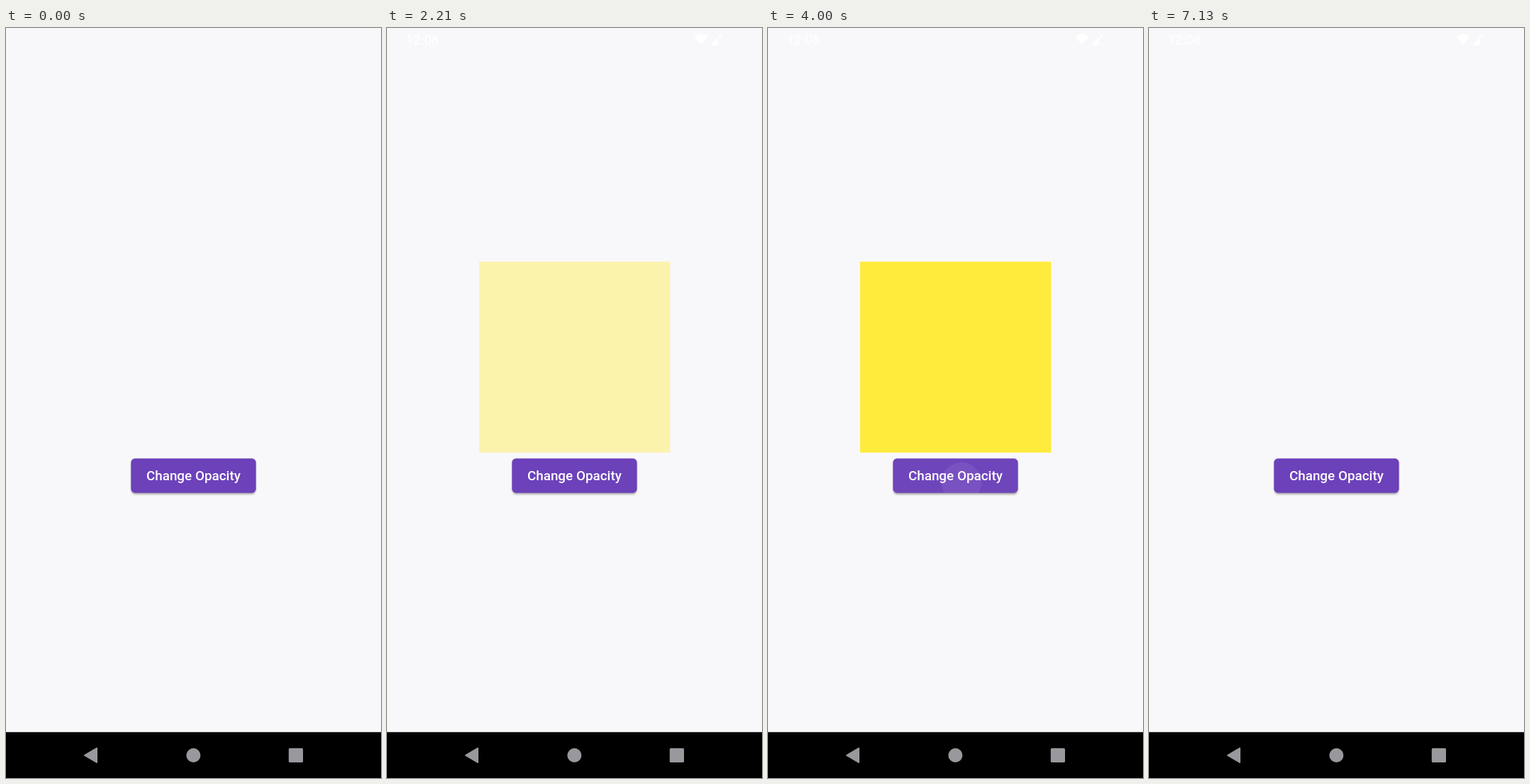
Recreate the animation shown at these times as an HTML page. Size 529 px wide and 1058 px high, loop 7180 ms.

```html
<!DOCTYPE html>
<html lang="en">
<head>
<meta charset="utf-8">
<title>Change Opacity</title>
<style>
  html, body { margin: 0; width: 100%; height: 100%; overflow: hidden; background: #f8f8fa; }
  svg { display: block; width: 100%; height: 100%; }
  text { font-family: Roboto, Arial, sans-serif; fill: #fff; }
</style>
</head>
<body>
<svg viewBox="0 0 529 1058">
  <defs>
    <clipPath id="buttonClip"><rect x="176.3" y="607.3" width="176.3" height="48.4" rx="5.4"/></clipPath>
    <filter id="blur" x="-20%" y="-50%" width="140%" height="200%"><feGaussianBlur id="shadowBlur" stdDeviation="1.6"/></filter>
  </defs>
  <rect width="529" height="1058" fill="#f8f8fa"/>

  <g id="status" fill="#fff">
    <text x="26.5" y="23" font-size="18.8">12:08</text>
    <path d="M433.5 12.2Q443 4.8 452.5 12.2L443 23.8Z"/>
    <path d="M456 24.2L472 8.2V13H467V24.2Z"/>
    <path d="M469 22.2h3v2h-3z"/>
  </g>

  <rect id="box" x="130" y="329.6" width="269.3" height="269.3" fill="#ffeb3b"/>

  <rect id="shadow" x="177" y="609.5" width="175" height="48" rx="5.4" opacity=".38" filter="url(#blur)"/>
  <g clip-path="url(#buttonClip)">
    <rect x="176" y="607" width="177" height="49" fill="#6c41ba"/>
    <rect id="highlight" x="176" y="607" width="177" height="49" fill="#fff"/>
    <circle id="ripple" fill="#fff"/>
  </g>
  <text x="264.4" y="638.3" font-size="18.86" font-weight="500" text-anchor="middle">Change Opacity</text>

  <rect y="993.3" width="529" height="65" fill="#000"/>
  <g fill="#99989d">
    <path d="M111 1026L128 1016V1036Z" stroke="#99989d" stroke-width="2" stroke-linejoin="round"/>
    <circle cx="264.4" cy="1026" r="10"/>
    <rect x="398.8" y="1016" width="20.2" height="20" rx="1.5"/>
  </g>
</svg>
<script>
const LOOP = 7180;
const FADE = 2000;
const INK = 0.24;
const TAP_POINT = { x: 273, y: 641 };
const CENTER = { x: 264.4, y: 631.5 };
const FULL_RADIUS = 92;
const taps = [{ down: 1265, up: 1400 }, { down: 3980, up: 4125 }];

const el = id => document.getElementById(id);
const [status, box, shadow, shadowBlur, highlight, ripple] =
  ['status', 'box', 'shadow', 'shadowBlur', 'highlight', 'ripple'].map(el);
const clamp = v => Math.min(1, Math.max(0, v));
const mix = (a, b, p) => a + (b - a) * p;
const set = (node, attrs) => {
  for (const name in attrs) node.setAttribute(name, attrs[name]);
};

// Cubic bezier (0.25, 0.1, 0.25, 1), solved by bisection.
function ease(x) {
  let lo = 0, hi = 1;
  for (let i = 0; i < 18; i++) {
    const s = (lo + hi) / 2;
    const bx = 0.75 * s * (1 - s) + s ** 3;
    if (bx < x) lo = s; else hi = s;
  }
  return 0.3 * lo * (1 - lo) ** 2 + 3 * lo * lo * (1 - lo) + lo ** 3;
}

function pressLevel(t, { down, up }) {
  const peak = clamp((Math.min(t, up) - down) / 200);
  return clamp(peak - Math.max(0, t - up) / 200);
}

// The ripple grows slowly while held, then quickly, and fades after release.
function rippleState(t, { down, up }) {
  const grown = (Math.min(t, up) - down) / 1000 + Math.max(0, t - up) / 225;
  const p = ease(clamp(grown));
  return {
    cx: mix(TAP_POINT.x, CENTER.x, p),
    cy: mix(TAP_POINT.y, CENTER.y, p),
    r: FULL_RADIUS * mix(0.3, 1, p),
    opacity: INK * clamp((t - down) / 75) * (1 - clamp((t - up - 225) / 150))
  };
}

function draw(t) {
  const tap = t < taps[1].down ? taps[0] : taps[1];
  const press = pressLevel(t, tap);
  const [show, hide] = taps.map(({ up }) => clamp((t - up) / FADE));
  set(status, { opacity: t < 40 ? 0 : 1 });
  set(box, { opacity: show - hide });
  set(highlight, { opacity: INK * press });
  set(shadow, { y: mix(609.5, 612, press) });
  set(shadowBlur, { stdDeviation: mix(1.6, 3.2, press) });
  set(ripple, t < tap.down ? { r: 0, opacity: 0 } : rippleState(t, tap));
}

const start = performance.now();
function tick() {
  draw((performance.now() - start) % LOOP);
  requestAnimationFrame(tick);
}
tick();
</script>
</body>
</html>
```
